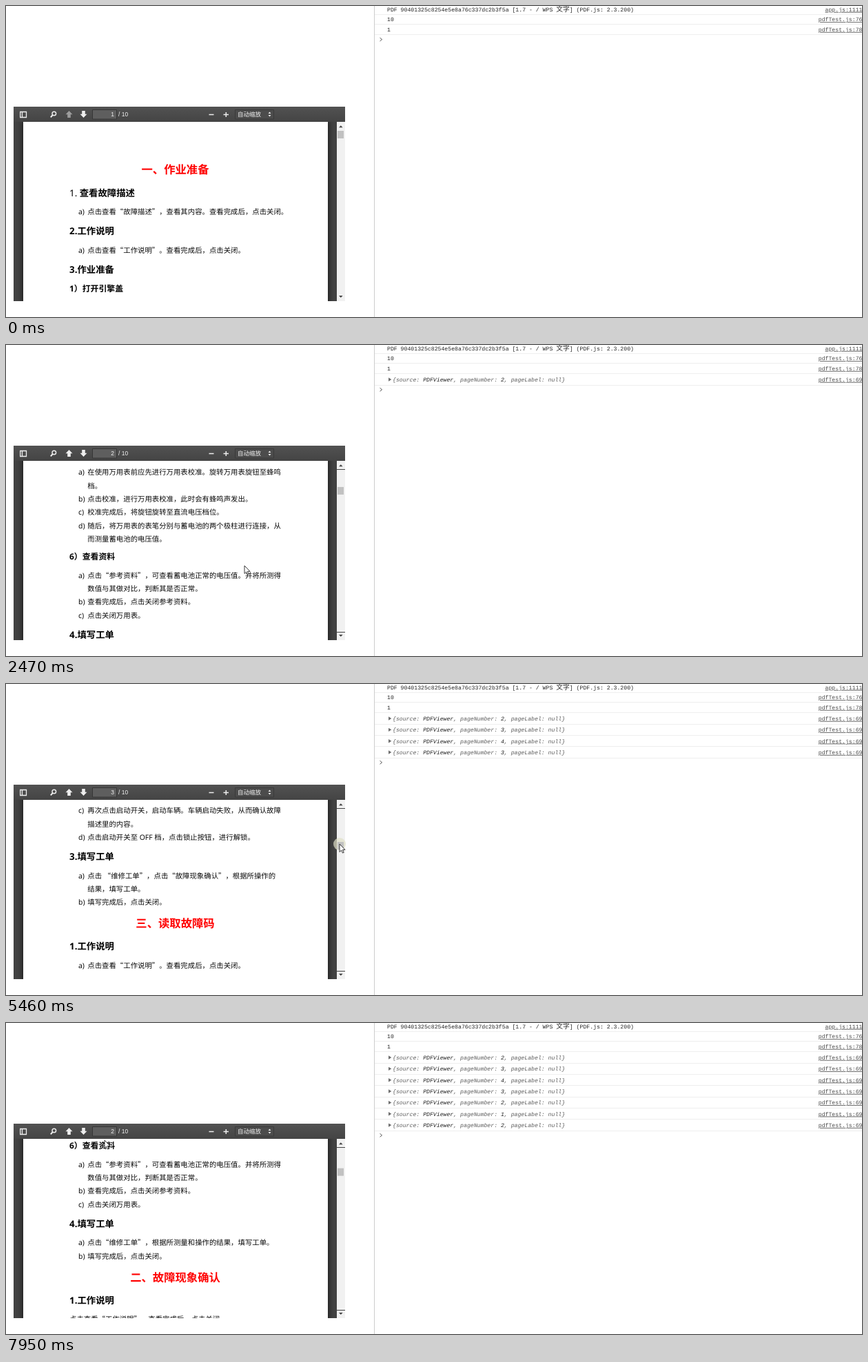
Recreate the animation shown at these times as an HTML page. Size 1242 px wide and 451 px high, loop 8000 ms.

```html
<!DOCTYPE html>
<html lang="zh-CN">
<head>
<meta charset="utf-8">
<title>PDF viewer and console</title>
<style>
html, body { margin: 0; width: 100%; height: 100%; overflow: hidden; background: #fff }
#view { position: absolute; left: 11px; top: 168px; width: 481px; height: 260px; overflow: hidden; background: #424242 }
#doc { font: 10.4px/19.3px "Noto Sans CJK SC", sans-serif; text-rendering: geometricPrecision;
  text-spacing-trim: space-all; font-kerning: none; color: #0a0a0a; white-space: pre }
#doc span { font-family: "Noto Sans", sans-serif; line-height: 0 }
.page { position: relative; box-sizing: border-box; width: 442px; height: 625px; margin: 0 0 9px 13.5px;
  padding: 54.4px 0 0 67.5px; background: #fff; box-shadow: 0 0 7px 1px rgba(0,0,0,.65) }
.page > :first-child { margin-top: 0 }
.title { margin: 6.65px 0 0 -67.5px; text-align: center; font-size: 16.33px; line-height: 29.3px; font-weight: 700; color: #f00 }
.h2 { margin: 6.1px 0 6.2px; font-size: 13.37px; line-height: 24px; font-weight: 700; color: #000 }
.h3 { margin: 6px 0 5px; font-size: 11.88px; line-height: 22.7px; font-weight: 700; color: #000 }
.item { margin-left: 26.3px }
.label { position: absolute; left: 80.5px; height: 19.3px }
#doc .label span { line-height: 19.3px }
.light { font-weight: 400 }
svg { position: absolute; left: 0; top: 0 }
#console { font: 8.18px "Liberation Mono", monospace; fill: #262626; text-rendering: geometricPrecision }
#console .link { text-anchor: end; text-decoration: underline; fill: #4c4c4c }
#console .obj { font-style: italic; fill: #5c5c5c }
.obj tspan { fill: #202020 }
#bar text { font: 500 8.5px "Liberation Sans", "Noto Sans CJK SC", sans-serif; fill: #f2f2f2 }
</style>
</head>
<body>
<div id="view"><div id="doc"></div></div>
<svg width="1242" height="451" viewBox="0 0 1242 451">
  <defs><linearGradient id="shade" x2="0" y2="1"><stop stop-color="#525252"/><stop offset="1" stop-color="#444"/></linearGradient></defs>
  <g id="console"><path d="M534.5 0V451" stroke="#ccc"/></g>
  <path id="prompt" d="M542.5-2.5L545.5 0L542.5 2.5" fill="none" stroke="#555"/>
  <g id="bar">
    <path fill="url(#shade)" d="M11 146H492V168H11Z"/>
    <path d="M20.7 153.5H29.5V161.5H20.7ZM23.5 153V162" fill="none" stroke="#eee" stroke-width="1.3"/>
    <g fill="none" stroke="#eee"><circle cx="69.8" cy="156" r="2.8" stroke-width="1.4"/><path d="M67.8 158L64.8 161.3" stroke-width="2"/></g>
    <path id="up" fill="#eee" d="M91.5 152L96.5 157.3H93.8V162H89.2V157.3H86.5Z"/>
    <path fill="#eee" d="M112.5 162L117.5 156.7H114.8V152H110.2V156.7H107.5Z"/>
    <path fill="#5e5e5e" stroke="#363636" d="M125.5 150.5H160.5V164H125.5Z"/>
    <text id="page" x="157" y="160" text-anchor="end"></text><text x="163" y="160">/ 10</text>
    <path d="M294.5 157.5H301.5M315.5 157.5H323M319.3 154V161" stroke="#eee" stroke-width="1.5"/>
    <path fill="#4c4c4c" stroke="#3a3a3a" d="M332.5 150.5H388.5V164H332.5Z"/>
    <text x="336" y="160">自动缩放</text>
    <path fill="#eee" d="M380.5 156L382.5 153.5 384.5 156ZM380.5 158L382.5 160.5 384.5 158Z"/>
  </g>
  <path fill="#f1f1f1" d="M480 168H492V428H480Z"/>
  <path fill="#444" d="M483 176.3L485.8 173.3 488.6 176.3ZM483 420L485.8 423 488.6 420Z"/>
  <path id="edges" d="M480 180.5H492M480 416.5H492" stroke="#444"/>
  <circle id="press" cx="484" r="9" fill="#e0e0c8" fill-opacity=".7"/>
  <rect id="thumb" x="481" width="9" height="11" fill="#c1c1c1"/>
  <path id="arrow" fill="#fff" stroke="#222" stroke-width=".9" d="M0 0V11.5L2.7 9 4.4 13 6.2 12.2 4.5 8.3H8Z"/>
  <path id="beam" fill="none" stroke="#222" d="M-2 .5H2M0 .5V11M-2 11H2"/>
</svg>
<script>
const $ = id => document.getElementById(id);

// Blank lines separate pages; ">" continues an item.
const TEXT = `一、作业准备
1. 查看故障描述
a) 点击查看“故障描述”，查看其内容。查看完成后，点击关闭。
2.工作说明
a) 点击查看“工作说明”。查看完成后，点击关闭。
3.作业准备
1）打开引擎盖
a) 点击“左前侧车门”，从而打开车门，并进入。
b) 点击“前引擎盖开启拉手”，从而解锁前引擎盖开关。
c) 点击“前引擎盖”，从而开启前引擎盖。
2）安装三件套
a) 点击“零件车”，在零件车上，分别选择并点击前垫块、后垫
>块、汽车三件套和劳保手套，进而安装和穿戴。
3）安装尾气抽气管
a) 点击“车辆尾气抽气管”，从而安装尾气抽气管。
4）检查发动机机油液位
a) 点击“机油标尺”，查看发动机机油液位是否正常。
b) 点击关闭弹窗，从而插入机油标尺。
5）测量蓄电池电压

a) 在使用万用表前应先进行万用表校准。旋转万用表旋钮至蜂鸣
>档。
b) 点击校准，进行万用表校准，此时会有蜂鸣声发出。
c) 校准完成后，将旋钮旋转至直流电压档位。
d) 随后，将万用表的表笔分别与蓄电池的两个极柱进行连接，从
>而测量蓄电池的电压值。
6）查看资料
a) 点击“参考资料”，可查看蓄电池正常的电压值。并将所测得
>数值与其做对比，判断其是否正常。
b) 查看完成后，点击关闭参考资料。
c) 点击关闭万用表。
4.填写工单
a) 点击“维修工单”，根据所测量和操作的结果，填写工单。
b) 填写完成后，点击关闭。
二、故障现象确认
1.工作说明
点击查看“工作说明”。查看完成后，点击关闭。
2.故障现象确认
a) 点击锁止按钮，进行锁止。
b) 点击启动开关至 ON 档，查看仪表的显示情况，确认仪表显示
>是否正常。

c) 再次点击启动开关，启动车辆。车辆启动失败，从而确认故障
>描述里的内容。
d) 点击启动开关至 OFF 档，点击锁止按钮，进行解锁。
3.填写工单
a) 点击 “维修工单”，点击“故障现象确认”，根据所操作的
>结果，填写工单。
b) 填写完成后，点击关闭。
三、读取故障码
1.工作说明
a) 点击查看“工作说明”。查看完成后，点击关闭。
2.故障码读取
a) 点击启动开关至 ON 档。
b) 在出现的诊断仪界面中，依据提示色块进行操作，直至读出故
>障码信息。
c) 随后，点击关闭诊断仪，最后，点击启动开关至 OFF 档。
3.填写工单
a) 点击 “维修工单”，点击“读取故障码”，依据操作测量的
>结果，填写工单。
b) 填写完成后，点击关闭。

四、读取数据流
1.工作说明
a) 点击查看“工作说明”。查看完成后，点击关闭。
2.数据流读取`;

const latin = text => text.replace(/[ -~]+/g, s => `<span${s.endsWith(' ') ? ' class="light"' : ''}>${s}</span>`);

function lineHtml(line) {
  const [, label, text] = line.match(/^([a-d]\) |>)?(.*)/);
  const cls = label ? 'item' : /^.、/.test(text) ? 'title' : /^\d\./.test(text) ? 'h2' : /^\d）/.test(text) ? 'h3' : 'plain';
  const mark = label && label !== '>' ? `<div class="label">${latin(label.trim())}</div>` : '';
  return `${mark}<div class="${cls}">${latin(text)}</div>`;
}

$('doc').innerHTML = TEXT.split('\n\n')
  .map(page => `<div class="page">${page.split('\n').map(lineHtml).join('')}</div>`).join('');

// Key points: time, then values.
const STEP = 75, LOOP = 8000, PAGE_PITCH = 634;
const SCROLL = [[1275, 0], [1425, 68], [2050, 540], [2475, 682], [3200, 1160], [3975, 1498], [4275, 1820],
  [5250, 1820], [5475, 1317], [6400, 100], [6900, 100], [7200, 265], [7350, 520], [7800, 811]];
const POINTER = [[75, 1080, 438], [525, 268, 268], [1275, 340, 308], [2475, 346, 320], [3975, 353, 327],
  [4425, 353, 333], [5175, 484, 251], [6400, 484, 188], [7200, 323, 320], [7950, 143, 170]];

function at(keys, t, col = 1) {
  const i = keys.findIndex(k => k[0] > t);
  if (i < 1) return keys[i < 0 ? keys.length - 1 : 0][col];
  const a = keys[i - 1], b = keys[i];
  return a[col] + (b[col] - a[col]) * (t - a[0]) / (b[0] - a[0]);
}

// A page counts as current once it passes the middle of the viewer.
const pageAt = t => 1 + Math.floor((at(SCROLL, t) + 134) / PAGE_PITCH);
const logs = [];
for (let t = STEP; t < LOOP; t += STEP)
  if (pageAt(t) !== pageAt(t - STEP)) logs.push({ t, page: pageAt(t) });

const row = (y, sep, body, link) => `<g>${body}<text class="link" x="1242.5" y="${y + 2.8}">${link}</text>
  <path d="M535 ${sep}H1242" stroke="#eee"/></g>`;
const plain = (y, text, link) => row(y, Math.round(y + 6.5) + .5, `<text x="553" y="${y + 2.8}">${text}</text>`, link);
const object = (y, page) => row(y, Math.round(y + 7.5) + .5, `<path d="M555 ${y - 2.7}L559.3 ${y}L555 ${y + 2.7}Z" fill="#6e6e6e"/>
  <text class="obj" x="561" y="${y + 2.8}">{source: <tspan>PDFViewer</tspan>, pageNumber: <tspan>${page}</tspan>, pageLabel: null}</text>`, 'pdfTest.js:69');
const logY = i => 50 + 16.35 * i;
$('console').insertAdjacentHTML('beforeend',
  plain(5, 'PDF 90401325c8254e5e8a76c337dc2b3f5a [1.7 - / WPS <tspan font-size="9.8">文字</tspan>] (PDF.js: 2.3.200)', 'app.js:1111') +
  plain(19.5, 10, 'pdfTest.js:76') + plain(34, 1, 'pdfTest.js:78') +
  logs.map((log, i) => object(logY(i), log.page)).join(''));
const logRows = [...document.querySelectorAll('#console g')].slice(3);

const show = (el, on) => el.style.display = on ? '' : 'none';

function draw(now) {
  const t = Math.round(now % LOOP / STEP) * STEP;
  const scroll = at(SCROLL, t), thumbY = 181 + scroll * .0365;
  $('doc').style.transform = `translateY(${-Math.round(scroll)}px)`;
  $('thumb').setAttribute('y', thumbY);

  const count = logs.filter(log => t >= log.t).length, page = pageAt(t);
  logRows.forEach((r, i) => show(r, i < count));
  $('prompt').setAttribute('transform', `translate(0 ${count ? logY(count - 1) + 14.7 : 48.5})`);
  $('page').textContent = page;
  $('up').setAttribute('opacity', page > 1 ? 1 : .5);
  show($('edges'), count > 0);

  const dragging = t >= 5250 && t <= 6400, overText = t >= 3975 && t < 4425;
  const x = at(POINTER, t), y = dragging ? thumbY + 3 : at(POINTER, t, 2);
  for (const id of ['arrow', 'beam']) $(id).setAttribute('transform', `translate(${x} ${y})`);
  show($('arrow'), t > 0 && !overText);
  show($('beam'), overText);
  $('press').setAttribute('cy', y);
  show($('press'), dragging);
}

const begin = performance.now();
function tick() {
  draw(performance.now() - begin);
  requestAnimationFrame(tick);
}
tick();
</script>
</body>
</html>
```
